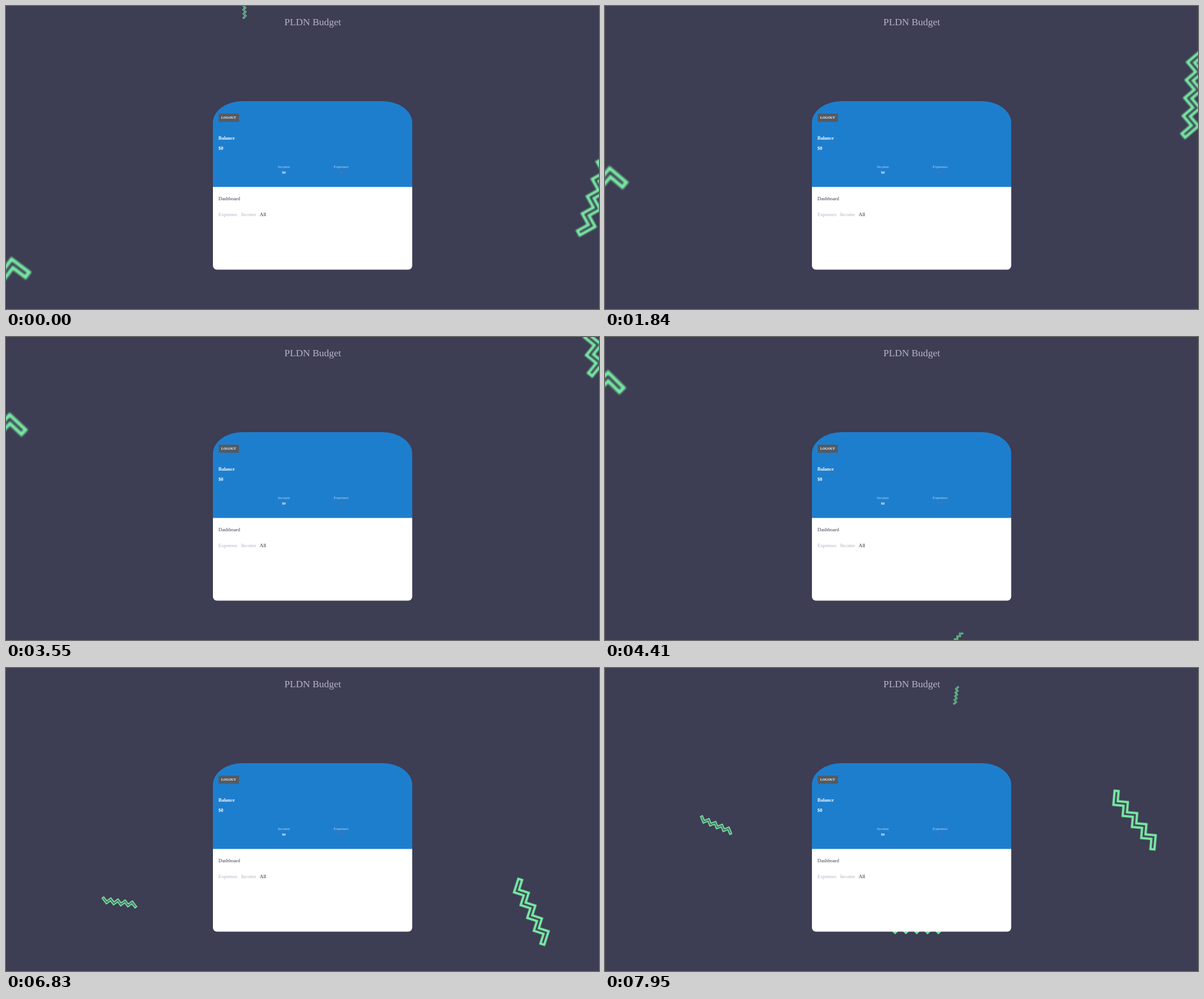
These frames come from a looping animation (1046x535 px, 8 s). An HTML page:

```html
<!DOCTYPE html>
<html lang="en">
<head>
<meta charset="utf-8">
<title>Budget dashboard</title>
<style>
  html, body { margin: 0; width: 100%; height: 100%; overflow: hidden; background: #3d3d54; }
  svg { display: block; width: 1046px; height: 535px; }
  text { font-family: "Liberation Serif", Tinos, "Times New Roman", serif; font-size: 8.8px; fill: #3d3d54; }
  .bold { font-weight: bold; font-size: 8.5px; fill: #fff; }
  .label { font-size: 6.95px; fill: #bbd7f0; }
  .sum { font-weight: bold; font-size: 6.5px; fill: #fff; }
  .mid { text-anchor: middle; }
  .off { fill: #b1b0c1; }

  /* x, y, r: pose at load; dx, dy, dr: change over one loop; k: scale */
  .zig {
    fill: none; stroke: #78eba3; stroke-width: 4;
    animation: rise 8s linear infinite;
  }
  @keyframes rise {
    from { transform: translate(var(--x), var(--y)) rotate(var(--r)) scale(var(--k)); }
    to {
      transform: translate(calc(var(--x) + var(--dx)), calc(var(--y) + var(--dy)))
        rotate(calc(var(--r) + var(--dr))) scale(var(--k));
    }
  }
  .left-near   { --x: -56px;  --y: 474px;    --r: 127deg;   --dx: -13.5px; --dy: -714px;  --dr: 14deg;    --k: 1.55; filter: blur(1.1px); }
  .right-near  { --x: 1041px; --y: 332.5px;  --r: 61deg;    --dx: -16.5px; --dy: -769px;  --dr: -49.6deg; --k: 1.245; filter: blur(.75px); }
  .top-small   { --x: 420.5px; --y: 5px;     --r: 43deg;    --dx: 0px;     --dy: -1096px; --dr: -60deg;   --k: .28; }
  .right-far   { --x: 880.8px; --y: 1418.4px; --r: 95.2deg; --dx: 53.6px;  --dy: -1157px; --dr: -90.7deg; --k: 1; }
  .left-far    { --x: 224.4px; --y: 1246.4px; --r: -128.5deg; --dx: -28.6px; --dy: -975px; --dr: 107.2deg; --k: .5; }
  .late-small  { --x: 619.3px; --y: 1137.7px; --r: 131.5deg; --dx: 0px;    --dy: -1096px; --dr: -80deg;   --k: .26; }
  .under-card  { --x: 580.5px; --y: 1130.4px; --r: -151.5deg; --dx: -35.7px; --dy: -675px; --dr: 107.2deg; --k: .75; }

  .cursor { animation: show 8s step-end infinite; }
  @keyframes show {
    0%, 11.5% { visibility: hidden; }
    8.75% { visibility: visible; }
  }
</style>
</head>
<body>
<svg viewBox="0 0 1046 535">
  <defs>
    <path id="zig" d="M-39.5-48.5h7v18h18v18h18v18h18v18h18v25h-7v-18h-18v-18h-18v-18h-18v-18h-18z"/>
  </defs>

  <use href="#zig" class="zig left-near"/>
  <use href="#zig" class="zig right-near"/>
  <use href="#zig" class="zig top-small"/>
  <use href="#zig" class="zig right-far"/>
  <use href="#zig" class="zig left-far"/>
  <use href="#zig" class="zig late-small"/>
  <use href="#zig" class="zig under-card"/>

  <text class="mid" x="541" y="34.3" style="font-size:17.4px;fill:#b7b5c7">PLDN Budget</text>

  <path fill="#fff" d="M365 319H716.5V458.5a7 7 0 0 1-7 7H372a7 7 0 0 1-7-7z"/>
  <path fill="#1e7ece" d="M365 319.5V206a52 38 0 0 1 52-38H664.5a52 38 0 0 1 52 38V319.5z"/>

  <rect x="375" y="190" width="36" height="14.6" rx="1.5" fill="#535b64"/>
  <text class="bold mid" x="392.8" y="199.3" style="font-size:5.9px">LOGOUT</text>

  <text class="bold" x="374.8" y="236">Balance</text>
  <text class="bold" x="374.8" y="254">$0</text>
  <text class="label mid" x="490.1" y="285.6">Income</text>
  <text class="sum mid" x="490.1" y="296">$0</text>
  <text class="label mid" x="591" y="285.6">Expenses</text>
  <text class="sum mid" x="591" y="296" style="fill:#626f9a">$0</text>

  <text x="374.8" y="343.3">Dashboard</text>
  <text class="off" x="374.8" y="371.3">Expenses</text>
  <text class="off" x="414.7" y="371.3">Income</text>
  <text x="447.6" y="371.3" style="fill:#22222f">All</text>

  <path class="cursor" fill="#fff" stroke="#1c1c28" stroke-width=".6"
    d="M1014 527.5v9l2-1.8 1.4 3 1.3-.6-1.4-2.9h2.7z"/>
</svg>
</body>
</html>
```
